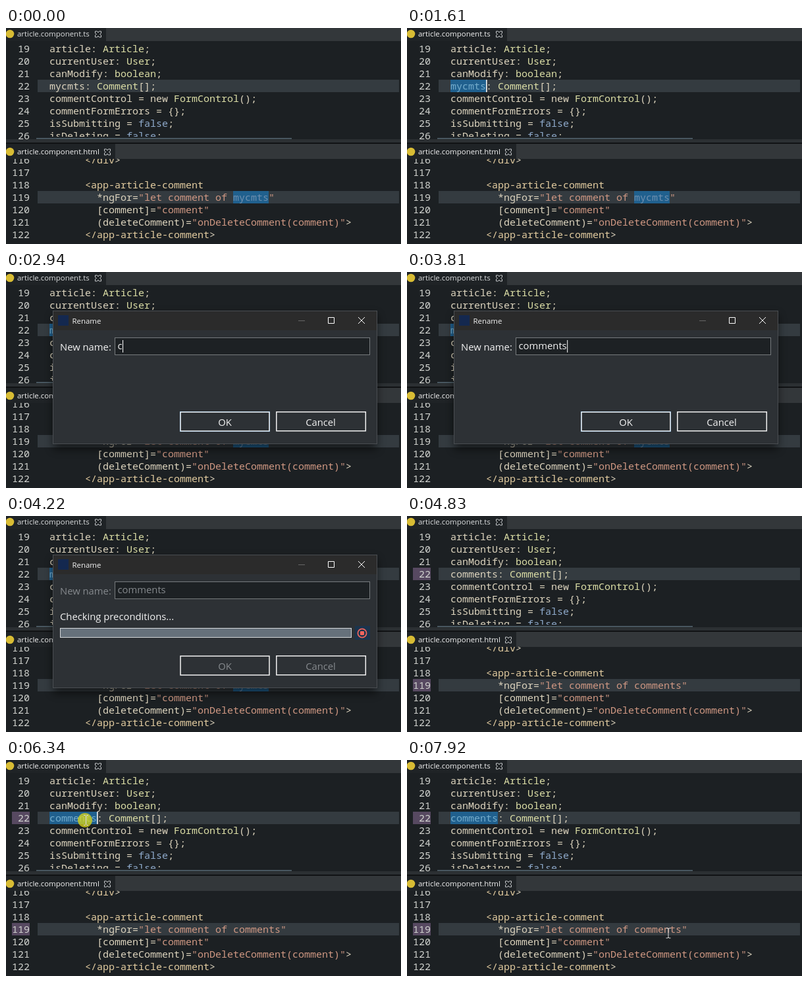
Recreate the animation shown at these times as an HTML page. Size 600 by 330 pixels, loop 7990 ms.

```html
<!DOCTYPE html>
<html lang="en">
<head>
<meta charset="utf-8">
<title>Rename refactoring</title>
<style>
  html, body { margin: 0; width: 100%; height: 100%; overflow: hidden; background: #1c2023; }
  svg { display: block; width: 600px; height: 330px; }
  text { white-space: pre; }
  .code { font: 15px "Noto Sans Mono", "DejaVu Sans Mono", monospace; fill: #ddd4be; }
  .ui { font: 14.8px "Open Sans", "Noto Sans", sans-serif; fill: #f2f2f2; }
  .small { font-size: 11.45px; }
  .num { fill: #d2d4d0; text-anchor: end; }
  .type { fill: #dcdea6; }
  .word { fill: #8faacb; }
  .tag { fill: #e3cca0; }
  .str { fill: #d09883; }
  .mid { text-anchor: middle; }
  .off { fill: #85898d; }
</style>
</head>
<body>
<svg id="stage" viewBox="0 0 600 330">
  <defs>
    <clipPath id="topClip"><rect y="20" width="600" height="150"/></clipPath>
    <clipPath id="lowClip"><rect y="200" width="600" height="130"/></clipPath>
    <filter id="shadow" x="-10%" y="-20%" width="120%" height="145%">
      <feGaussianBlur stdDeviation="7"/>
    </filter>
    <g id="cross" fill="none">
      <path d="M-4.5-4.5h3L0-2.5 1.5-4.5h3v3L2.5 0 4.5 1.5v3h-3L0 2.5-1.5 4.5h-3v-3L-2.5 0-4.5-1.5z" stroke="#c6c9cb"/>
    </g>
  </defs>

  <rect width="600" height="330" fill="#1c2023"/>
  <g clip-path="url(#topClip)"><g id="top" class="code"></g></g>
  <rect x="46" y="166" width="554" height="4" fill="#1c2023"/>
  <rect x="46" y="168" width="388" height="1.5" fill="#566873"/>
  <g clip-path="url(#lowClip)"><g id="low" class="code"></g></g>
  <g id="tabs"></g>
  <rect id="caret" y="79" width="1.6" height="19" fill="#f4f4f4"/>

  <g id="dialog">
    <rect x="72" y="66" width="491" height="204" fill="#000" opacity=".6" filter="url(#shadow)"/>
    <rect x="71.5" y="59.5" width="492" height="203" fill="#2d3135" stroke="#4a4e52"/>
    <rect x="72" y="60" width="491" height="29" fill="#2b2b2b"/>
    <rect x="79" y="66" width="16" height="16" fill="#14284f"/>
    <text class="ui small" x="100.5" y="79">Rename</text>
    <path d="M444 74.5h10" stroke="#666"/>
    <path d="M489.5 69.5h9v9h-9zM535 69l10 10m0-10l-10 10" fill="none" stroke="#fff"/>
    <text id="label" class="ui" x="82" y="120">New name:</text>
    <rect x="165.5" y="100.5" width="387" height="26" fill="#1d2124" stroke="#777b7e"/>
    <rect id="fieldSel" x="170" y="102" width="56" height="20" fill="#2878c8"/>
    <text id="field" class="ui" x="169.5" y="118"></text>
    <rect id="fieldCaret" y="104" width="1" height="19" fill="#fff"/>
    <g id="check">
      <text class="ui" x="82" y="159">Checking preconditions...</text>
      <rect x="82.5" y="171.5" width="442" height="14" fill="#2d3135" stroke="#d5d8da"/>
      <rect id="bar" x="83" y="172" height="13" fill="#66717b"/>
      <rect x="530" y="168" width="23" height="21" fill="#1b344d"/>
      <circle cx="541" cy="179" r="6.6" fill="none" stroke="#f2655d" stroke-width="1.7"/>
      <rect x="538" y="176" width="6" height="6" rx="1" fill="#f2655d"/>
    </g>
    <g fill="none">
      <rect id="okEdge" x="264" y="213" width="137" height="31" fill="#2d8ad8"/>
      <rect id="okFace" x="265" y="214" width="135" height="29" fill="#2d3135" stroke="#f3f3f3" stroke-width="1.5"/>
      <rect x="410.8" y="213.8" width="135.5" height="29" fill="#2d3135" stroke="#f3f3f3" stroke-width="1.5"/>
    </g>
    <text id="ok" class="ui mid" x="332.5" y="235">OK</text>
    <text id="cancel" class="ui mid" x="478" y="235">Cancel</text>
  </g>

  <circle id="click" r="11" fill="#dcd818" opacity=".75"/>
  <path id="beam" d="M-3.5-7.5h2.5l1 1 1-1h2.5M0-6.5v13M-3.5 7.5h2.5l1-1 1 1h2.5" fill="none" stroke="#dcdcdc"/>
  <path id="arrow" d="M18.5 292.5v15l3.4-3.2 2.4 5.8 2.2-1-2.4-5.5h4.9z" fill="#fff" stroke="#111" stroke-width=".8"/>
</svg>

<script>
const LOOP = 7990, ROW = 19, COL = 9;
const $ = id => document.getElementById(id);
const show = (el, on) => { el.style.display = on ? "" : "none"; };
const within = (t, ...spans) => spans.some(([a, b]) => t >= a && t < b);

const RULES = {
  ts: [[/^(Article|User|FormControl|Comment(?=\[)|boolean)/, "type"], [/^false/, "word"]],
  html: [[/^"[^"]*"/, "str"], [/^<\/?[\w-]+/, "tag"]]
};

// Wraps the words that match a rule in coloured spans.
function paint(line, lang) {
  const esc = s => s.replace(/&/g, "&amp;").replace(/</g, "&lt;");
  let out = "";
  while (line) {
    const rule = RULES[lang].find(([re]) => re.test(line));
    const part = rule ? line.match(rule[0])[0] : line.match(/^(\w+|.)/)[0];
    out += rule ? `<tspan class="${rule[1]}">${esc(part)}</tspan>` : esc(part);
    line = line.slice(part.length);
  }
  return out;
}

const box = (cls, x, y, w, fill, opacity = 1) =>
  `<rect class="${cls}" x="${x}" y="${y}" width="${w}" height="${ROW}" fill="${fill}" opacity="${opacity}"/>`;

function editor(id, first, top, lang, current, selCol, lines) {
  const y = top + (current - first) * ROW;
  let html = box("line", 48, y, 549, "#343b40") + box("mark", 9, y, 27, "#574961");
  lines.forEach((line, i) => {
    const base = top + i * ROW + 15;
    const put = (s, cls) => `<text class="${cls}" x="48" y="${base}">${paint(s, lang)}</text>`;
    html += `<text class="num" x="36" y="${base}">${first + i}</text>`;
    html += line.includes("@")
      ? put(line.replace("@", "mycmts"), "old") + put(line.replace("@", "comments"), "new")
      : put(line, "");
  });
  // The selection tints the text under it.
  $(id).innerHTML = html + box("sel", 48 + selCol * COL, y, 54, "#0c85dc", .5);
}

editor("top", 19, 22, "ts", 22, 2, [
  "  article: Article;",
  "  currentUser: User;",
  "  canModify: boolean;",
  "  @: Comment[];",
  "  commentControl = new FormControl();",
  "  commentFormErrors = {};",
  "  isSubmitting = false;",
  "  isDeleting = false;"
]);
editor("low", 116, 192, "html", 119, 33, [
  "        </div>",
  "",
  "        <app-article-comment",
  "          *ngFor=\"let comment of @\"",
  "          [comment]=\"comment\"",
  "          (deleteComment)=\"onDeleteComment(comment)\">",
  "        </app-article-comment>"
]);

const tab = (id, y, width, name) => `
  <rect y="${y - 3}" width="600" height="23" fill="#33373a"/>
  <rect y="${y - 3}" width="${width}" height="23" fill="#1f2326"/>
  <circle cx="6" cy="${y + 9}" r="6.3" fill="#d8bc34"/>
  <text id="${id}" class="ui small" x="17" y="${y + 13}">${name}</text>
  <use href="#cross" x="${width - 12}" y="${y + 9.5}"/>`;
$("tabs").innerHTML = tab("tsTab", 0, 152, "article.component.ts") +
  `<rect y="170" width="600" height="7" fill="#2c3033"/><rect y="175" width="600" height="2" fill="#101214"/>` +
  tab("htmlTab", 180, 166, "article.component.html");

// start, end, from x, y, to x, y
const MOVES = [
  [530, 870, 99.5, 80.5, 94.5, 91],
  [5300, 6070, 470, 104, 121.5, 92],
  [6610, 7370, 121.5, 92, 457, 291],
  [7440, 7920, 452, 290, 397, 264.5]
];
const STEP = 70;

function pointer(t) {
  if (!within(t, [530, 1610], [5300, LOOP])) return null;
  const [a, b, x0, y0, x1, y1] = MOVES.filter(m => t >= m[0]).pop();
  const p = Math.min(1, Math.floor((t - a) / STEP) * STEP / (b - a - (b - a) % STEP));
  const e = p * p * (3 - 2 * p);
  return [x0 + (x1 - x0) * e, y0 + (y1 - y0) * e];
}

const TYPED = [2940, 3020, 3220, 3330, 3440, 3550, 3660, 3770];

function drawDialog(t) {
  const open = within(t, [2010, 4760]);
  show($("dialog"), open);
  if (!open) return;
  const fade = Math.floor((t - 4550) / STEP);
  $("dialog").style.opacity = fade < 0 ? 1 : [.7, .35, .1][fade] || 0;

  const count = TYPED.filter(k => t >= k).length;
  const busy = t >= 4010;
  $("field").textContent = count ? "comments".slice(0, count) : "mycmts";
  show($("fieldSel"), !count);
  show($("fieldCaret"), count && !busy);
  $("fieldCaret").setAttribute("x", 170 + $("field").getComputedTextLength());
  for (const id of ["label", "field", "ok", "cancel"]) $(id).classList.toggle("off", busy);

  show($("okEdge"), !busy);
  $("okFace").setAttribute("fill", within(t, [3940, 4010]) ? "#3b4f63" : "#2d3135");
  show($("check"), t >= 4080);
  $("bar").setAttribute("width", t < 4150 ? 0 : t < 4220 ? 221 : 441);
}

function draw(t) {
  const renamed = t >= 4620;
  for (const el of document.querySelectorAll(".old")) show(el, !renamed);
  for (const el of document.querySelectorAll(".new")) show(el, renamed);
  for (const el of document.querySelectorAll(".mark")) show(el, t >= 4830);

  const topSel = document.querySelector("#top .sel");
  show(topSel, within(t, [1280, 4620], [6340, LOOP]));
  topSel.setAttribute("width", renamed ? 72 : 54);
  show(document.querySelector("#low .sel"), !renamed);
  $("tsTab").style.fill = within(t, [1140, 2010]) || t >= 4900 ? "#f2f2f2" : "#dcdedf";

  show($("caret"), within(t, [1140, 2010], [4900, 5720], [6270, 6870], [7370, 7920]));
  $("caret").setAttribute("x", t < 1280 ? 92.5 : t < 6340 ? 120 : 138);

  drawDialog(t);

  const at = pointer(t);
  show($("beam"), at);
  show($("click"), within(t, [1070, 1140], [1210, 1410], [6200, 6270], [6340, 6410]));
  if (at) {
    $("beam").setAttribute("transform", `translate(${at[0]} ${at[1]})`);
    $("click").setAttribute("transform", `translate(${at[0] - 1.5} ${at[1]})`);
  }
  show($("arrow"), within(t, [190, 260]));
}

const start = performance.now();
function tick() {
  draw((performance.now() - start) % LOOP);
  requestAnimationFrame(tick);
}
tick();
</script>
</body>
</html>
```
